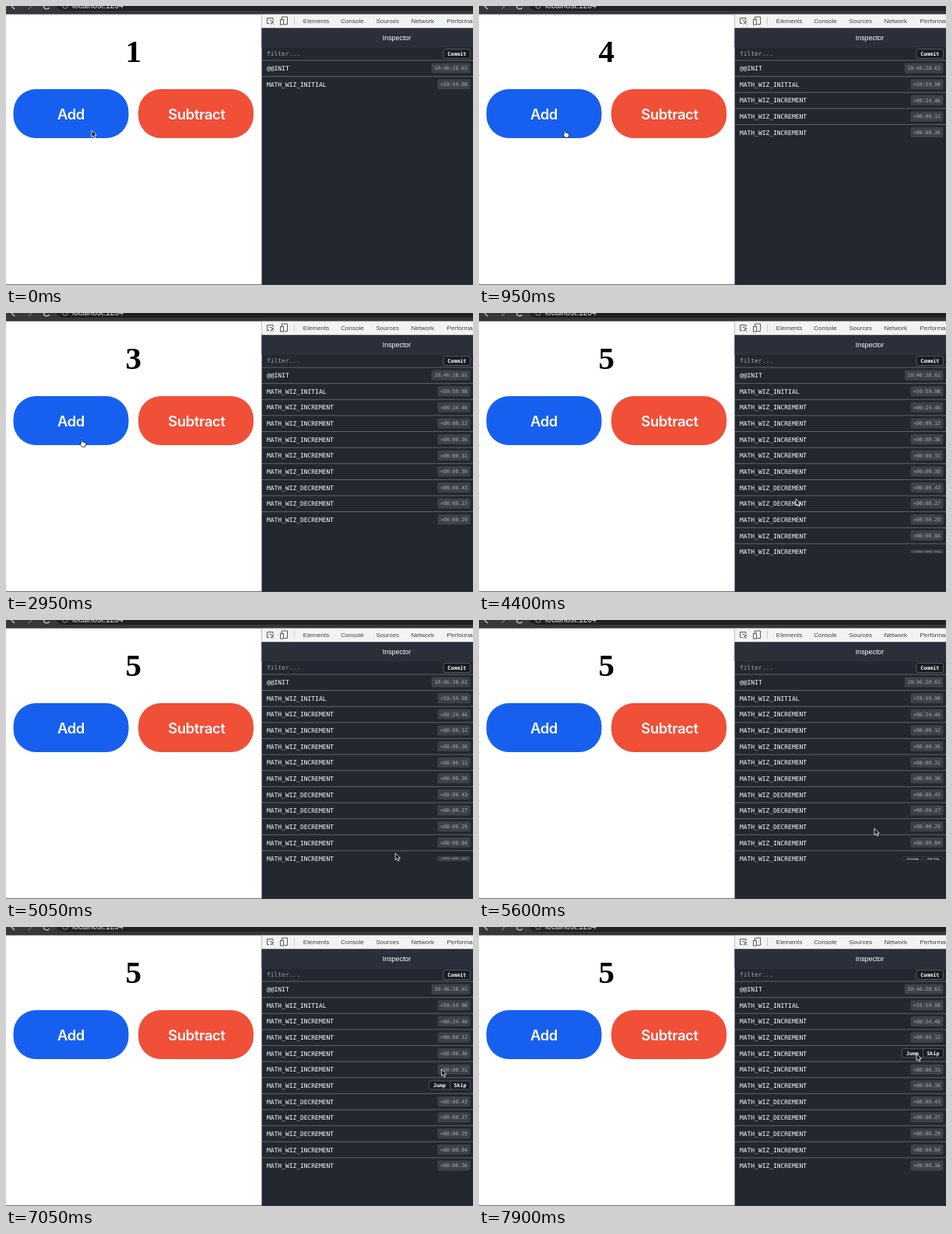
Write an HTML page that moves like this. It is 600 by 359 pixels and loops after 8000 ms.

```html
<!DOCTYPE html>
<html lang="en">
<head>
<meta charset="utf-8">
<title>Counter with action inspector</title>
<style>
  html, body { margin: 0; width: 100%; height: 100%; overflow: hidden; background: #fff; }
  svg { display: block; width: 600px; height: 359px; }
  text { white-space: pre; }
  .sans { font-family: "Liberation Sans", Arial, sans-serif; }
  .mono { font-family: "DejaVu Sans Mono", monospace; font-size: 7.95px; fill: #fff; }
  .badge { font-size: 6.45px; fill: #a9adb4; }
  .small { font-size: 6.6px; font-weight: bold; }
  .label { font: 600 18.4px Inter, sans-serif; letter-spacing: -.35px; fill: #fff; text-anchor: middle; }
  .count { font: bold 41px "Liberation Serif", "Times New Roman", serif; text-anchor: middle; }
  .tab { font-size: 8.05px; fill: #404040; }
  .box { fill: #191c22; stroke: #6a6e75; stroke-width: .7; }
  .line { stroke: #666a71; stroke-width: .9; }
</style>
</head>
<body>
<svg id="stage" viewBox="0 0 600 359">
  <rect width="600" height="359" fill="#fff"/>
  <g id="browser">
    <rect width="600" height="10.7" fill="#36373b"/>
    <rect x="63" y="-16" width="560" height="22" rx="11" fill="#202124"/>
    <g fill="none" stroke-width="1.2">
      <path d="M9 -2L7 0L11 4" stroke="#d5d6d8"/>
      <path d="M29 4L33 0" stroke="#77797d"/>
      <path d="M48.5 0A3.8 3.8 0 0 0 55.6 2" stroke="#d5d6d8"/>
      <circle cx="76" cy="0" r="3.2" stroke="#a0a3a7" stroke-width=".9"/>
    </g>
    <text x="85" y="2.6" font-size="10.2" fill="#e4e5e7" class="sans">localhost:1234</text>
  </g>

  <text id="count" class="count" x="163.7" y="72">1</text>
  <rect x="9.5" y="107" width="148" height="63" rx="29" fill="#1760ef"/>
  <rect x="170" y="107" width="148" height="63" rx="29" fill="#f04f38"/>
  <text class="label" x="83.5" y="146">Add</text>
  <text class="label" x="245" y="146">Subtract</text>

  <rect x="328.5" y="10.7" width="272" height="349" fill="#232830"/>
  <rect x="328.5" y="10.7" width="272" height="17.8" fill="#f3f3f3"/>
  <g fill="none" stroke="#5a5a5a">
    <path d="M338 22.5H335.5V15.5H343V18"/>
    <path d="M338.5 18L344 20.2L341.6 21L344 23.8M341.6 21L340.2 23.4Z"/>
    <path d="M354.5 17V14H361.5V23.5H357.5"/>
    <rect x="352.5" y="17.5" width="4" height="6.5"/>
    <path d="M370.5 14V24" stroke="#ccc"/>
  </g>
  <g id="tabs" class="sans"></g>
  <rect x="328.5" y="28.5" width="272" height="24.5" fill="#2a2f3a"/>
  <text class="sans" x="502" y="44" font-size="8.9" fill="#fff" text-anchor="middle">Inspector</text>
  <text class="mono" x="335" y="64" style="fill:#a2a5aa">filter...</text>
  <rect class="box" x="562" y="55.5" width="34.5" height="12" rx="2"/>
  <text class="mono small" x="567.3" y="63.9">Commit</text>
  <path d="M328.5 53H600" stroke="#343943" stroke-width=".7"/>
  <g id="rows"></g>
  <rect y="358.3" width="600" height=".7" fill="#33363a"/>
  <g id="pointer" stroke-linejoin="round">
    <path id="arrow" d="M0 0V8.7L2 6.9L3.4 10L5 9.3L3.7 6.3H6.3Z" fill="#111" stroke="#fff" stroke-width=".8"/>
    <path id="hand" d="M-.8 .6Q0 -.6 .9 .6L1.4 3.2L2.3 2.9L3 3.5L4 3.2L4.6 3.9L5.6 4V6.6L4.7 9.2H.6L-2 5.8Q-2 4.6 -.6 5.2Z" fill="#fff" stroke="#111" stroke-width=".8"/>
  </g>
</svg>
<script>
const LOOP = 8000, STEP = 50, PITCH = 20.63, FLIP = 200;
const $ = id => document.getElementById(id);

// Time of arrival, action, clock text
const actions = [
  [0, "@@INIT", "10:46:28.61"],
  [0, "MATH_WIZ_INITIAL", "+59:59.98"],
  [230, "INC", "+00:24.46"],
  [350, "INC", "+00:00.12"],
  [710, "INC", "+00:00.36"],
  [1020, "INC", "+00:00.31"],
  [1320, "INC", "+00:00.30"],
  [1750, "DEC", "+00:00.43"],
  [2020, "DEC", "+00:00.27"],
  [2310, "DEC", "+00:00.29"],
  [3150, "INC", "+00:00.84"],
  [3510, "INC", "+00:00.36"]
];
const names = { INC: "MATH_WIZ_INCREMENT", DEC: "MATH_WIZ_DECREMENT" };
const delta = { INC: 1, DEC: -1 };

// Row, hover start, hover end
const hovers = [
  [11, 4050, 4264], [11, 5000, 5532], [9, 5650, 6000], [8, 6000, 6350],
  [7, 6350, 6850], [6, 6850, 7060], [5, 7060, 7700], [4, 7700, 9000]
];

// Time, x, y of the pointer tip
const track = [
  [0, 110, 160], [1330, 110, 160], [1700, 226.5, 153], [2350, 226.5, 153],
  [2900, 97, 163], [3600, 97, 163], [4220, 398, 300], [4400, 407, 239],
  [5000, 500, 300], [5450, 506, 302], [5600, 508, 268], [5950, 528, 258],
  [6350, 546, 240], [6750, 555, 224], [6950, 559, 203], [7050, 559.5, 183],
  [7600, 560, 181], [7700, 562, 163], [8000, 562, 163]
];

const clamp = v => Math.max(0, Math.min(1, v));
const smooth = v => v * v * (3 - 2 * v);
const rule = y => `<path class="line" d="M328.5 ${y}H600"/>`;

function buildRow([, type, clock], i) {
  const y = 80 + i * PITCH, w = clock.length * 3.885 + 7;
  return `<g id="row${i}">${rule(y - 10)}
    <text class="mono" x="335" y="${y + 3.2}">${names[type] || type}</text>
    <g transform="translate(0 ${y})">
      <g id="badge${i}">
        <rect x="${596.5 - w}" y="-6.5" width="${w}" height="13" rx="2" fill="#3d424a"/>
        <text class="mono badge" x="${600 - w}" y="2.4">${clock}</text>
      </g>
      <g id="tools${i}">
        <rect class="box" x="543.5" y="-5.8" width="53" height="11" rx="2"/>
        <path class="box" d="M570.5 -5.8V5.2"/>
        <text class="mono small" x="549" y="2.2">Jump</text>
        <text class="mono small" x="575.5" y="2.2">Skip</text>
      </g>
    </g></g>`;
}

$("tabs").innerHTML = [["Elements", 381.8], ["Console", 430.2], ["Sources", 475.5], ["Network", 520.5], ["Performance", 566.5]]
  .map(([name, x]) => `<text class="tab" x="${x}" y="21.7">${name}</text>`).join("");
$("rows").innerHTML = actions.map(buildRow).join("");

function show(el, visible) {
  el.style.display = visible ? "" : "none";
}

function fold(el, scale) {
  show(el, scale > 0.02);
  el.setAttribute("transform", `scale(1 ${scale})`);
}

function flipOf(row, t) {
  return Math.max(0, ...hovers.filter(h => h[0] === row)
    .map(([, on, off]) => Math.min(clamp((t - on) / FLIP), 1 - clamp((t - off) / FLIP))));
}

function pointerAt(t) {
  const k = track.findIndex(p => p[0] > t);
  const [t0, x0, y0] = track[k - 1], [t1, x1, y1] = track[k];
  const u = smooth((t - t0) / (t1 - t0));
  return [x0 + (x1 - x0) * u, y0 + (y1 - y0) * u];
}

function draw(t) {
  let count = 1;
  actions.forEach(([at, type], i) => {
    const here = t >= at;
    show($("row" + i), here);
    if (!here) return;
    count += delta[type] || 0;
    const p = flipOf(i, t);
    fold($("badge" + i), clamp(1 - 2 * p));
    fold($("tools" + i), clamp(2 * p - 1));
  });
  $("count").textContent = count;

  const [x, y] = pointerAt(t);
  const onButton = t >= 100 && y > 107 && y < 170 && (x > 10 && x < 157 || x > 170 && x < 318);
  $("pointer").setAttribute("transform", `translate(${x} ${y})`);
  show($("hand"), onButton);
  show($("arrow"), !onButton);
}

const start = performance.now();
function tick() {
  const t = (performance.now() - start) % LOOP;
  draw(Math.floor(t / STEP) * STEP);
  requestAnimationFrame(tick);
}
draw(0);
requestAnimationFrame(tick);
</script>
</body>
</html>
```
